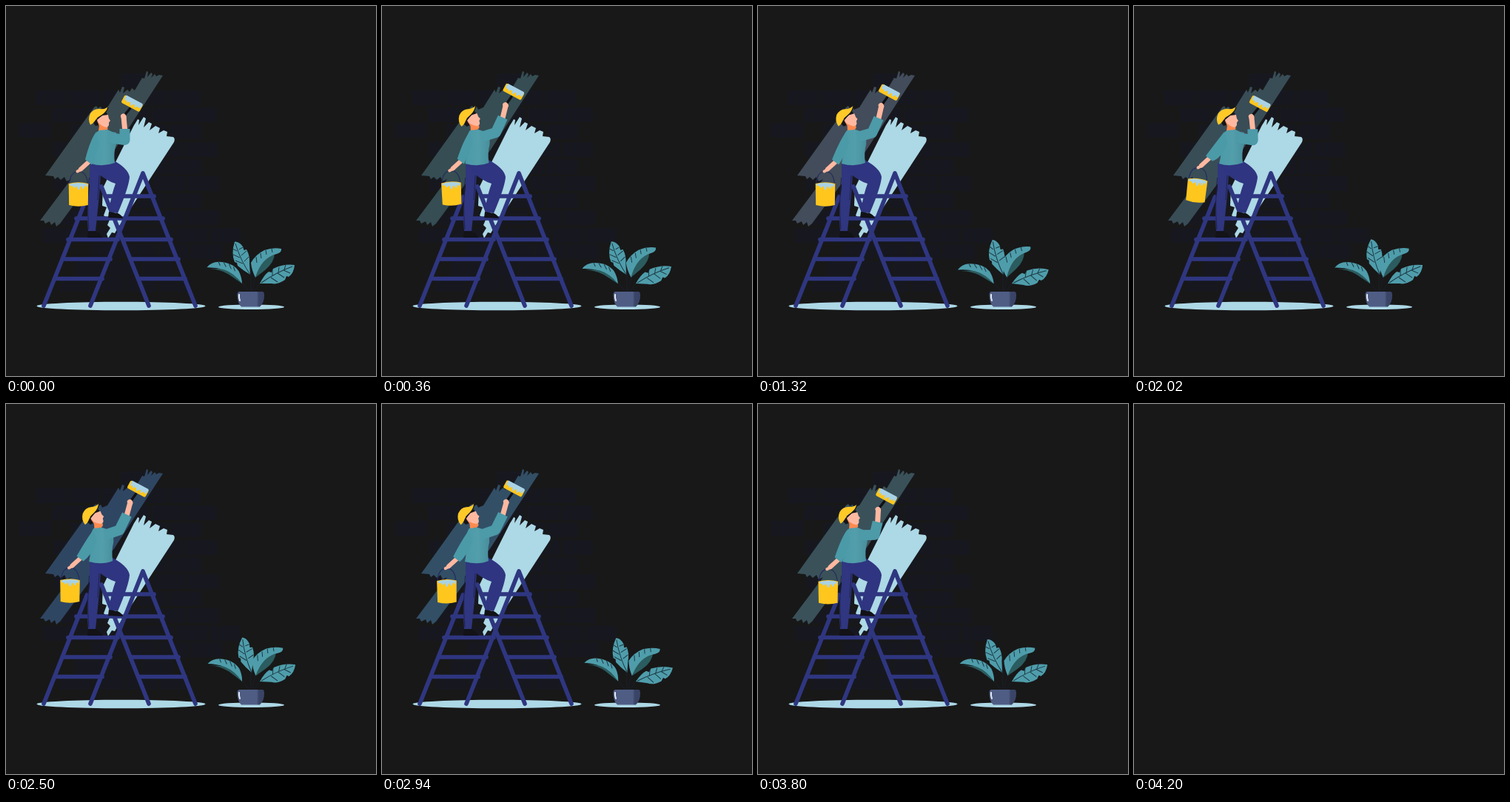
Write an HTML page that moves like this. It is 500x500 px and loops after 4220 ms.

```html
<!DOCTYPE html>
<html lang="en">
<head>
<meta charset="utf-8">
<title>Painter on a ladder</title>
<style>
html, body { margin: 0; width: 100%; height: 100%; overflow: hidden; background: #181818; }
svg { display: block; width: 100vw; height: 100vh; }
.vein { fill: none; stroke: #1b3843; stroke-width: 1; }
.skin { fill: none; stroke: #ffb8a0; stroke-linecap: round; stroke-linejoin: round; }
</style>
</head>
<body>
<svg viewBox="0 0 500 500">
  <defs>
    <linearGradient id="shirt"><stop offset="0" stop-color="#4b9aa8"/><stop offset=".55" stop-color="#539eab"/><stop offset="1" stop-color="#488f9d"/></linearGradient>
    <linearGradient id="pot"><stop offset=".72" stop-color="#4f5d85"/><stop offset=".8" stop-color="#3a4467"/></linearGradient>
  </defs>
  <g id="scene">
    <g id="bricks" fill="#17181f"/>
    <path id="strokes" d="M46 290L88 234L82 237L79 231L74 235L70 231L66 234L64 230L53 229L119 137L122 135L124 138L128 136L130 140L137 137L152 113L154 117L157 109L160 110L158 118L164 113L167 116L170 111L174 114L184 97L187 98L190 88L192 89L191 96L196 90L198 92L196 97L201 92L203 95L207 93L212 94L147 194L73 294L68 298L66 292L61 296L59 291L53 294L51 290Z"/>
    <path fill="#add8e6" d="M173 161L175 158L178 153L180 154L179 161L186 150L189 152L186 164L193 157L197 159L194 168L202 162L208 165L206 172L213 168L218 170L217 176L226 177Q229 179 227 184L157 291L151 300L147 307L143 306L138 314L136 308L141 300L137 296L140 289L132 283L136 272L130 270L131 246L146 215Z"/>
    <g fill="#add8e6">
      <ellipse cx="155.5" cy="405.5" rx="114" ry="5.8"/>
      <ellipse cx="331.5" cy="406.7" rx="44.5" ry="3.3"/>
    </g>
    <path id="ladder" fill="none" stroke="#2f3680" stroke-width="5.7" stroke-linecap="round" stroke-linejoin="round"
      d="M51 405L109.500 258M193 405L129 244M114 405L185 226L256 405M134 257H200M95 287H212M84 315.500H151M159 315.500H223M76 342H141M169 342H233M67 368.500H130M180 368.500H242"/>

    <g id="plant">
      <path d="M331 350V387M320 375L330 388M337 366L332 387M343 375L334 388" fill="none" stroke="#1a1c24" stroke-width="1.5"/>
      <g id="leafLeft">
        <path fill="#2b5c5f" d="M276 354Q290 355 301 362L319 375Q319 363 309 355Z"/>
        <path fill="#4f9dab" d="M272 352Q278 345 288 345Q307 346 315 358Q319 366 319 375Q309 361 296 356Q284 352 272 352Z"/>
        <path class="vein" d="M288 345L290 350M295 346L298 352M302 348L305 355M308 352L310 358"/>
      </g>
      <g id="leafUp">
        <path fill="#4f9dab" d="M309 318.500Q315 318 320 325L321.500 330L325 329Q330 338 329 348L330 363Q320 357 313 351L312 347L309 346Q304 334 309 318.500Z"/>
        <path class="vein" d="M310 321Q317 344 330 363M315 329L320 326M318 337L325 331M322 345L328 339M312 331L306 328M316 340L307 336M320 348L310 344"/>
      </g>
      <g id="leafRight">
        <path fill="#2b5c5f" d="M337 367Q342 344 363 334Q363 346 350 357Z"/>
        <path fill="#4f9dab" d="M372 328Q373 333 366 335Q345 340 337 367Q332 357 331 347Q337 336 349 330Q361 326 372 328Z"/>
        <path class="vein" d="M359 328L360 333M351 330L352 336M344 334L345 341M338 339L339 347"/>
      </g>
      <g id="leafLow">
        <path fill="#4f9dab" d="M390 350Q389 361 382 366L379 365L377 370Q367 377 359 375L343 375Q349 363 355 359L359 360L361 355Q376 348 390 350Z"/>
        <path class="vein" d="M387 352Q365 360 345 374M360 365L360 357M368 360L369 353M376 356L378 350M358 367L367 373M367 361L376 367M375 357L384 361"/>
      </g>
      <path fill="url(#pot)" d="M315 386H347Q349 386.500 349 391Q349 401 343 406.500H318Q313 402 312.500 391Q312.500 386.500 315 386Z"/>
      <path d="M315 390Q314.500 394 316 398" fill="none" stroke="#e3edf5" stroke-width="2" stroke-linecap="round"/>
    </g>

    <g id="legs">
      <path fill="#30367f" d="M113 212L129 212L126 256L121 304L111 304Q108 274 113 245Z"/>
      <path fill="#2f3580" d="M117 213L144 208Q165 219 167 231Q166 245 151 280L139 277Q142 256 148 240Q135 236 122 224Z"/>
      <path fill="none" stroke="#1b1e4a" stroke-width=".8" d="M112.500 232Q109 268 112 302M126 229L124 262"/>
      <path fill="#121217" d="M111 304.500L121 304.500Q129 308 130 313H110ZM139 278L151 280Q157 283 158 287L138 286Z"/>
    </g>
    <g id="bucket">
      <path d="M-12.500 17Q-11 0 0 0Q11 0 12.500 17" fill="none" stroke="#252b5e" stroke-width="1.2"/>
      <path fill="#ffc61e" d="M-13.300 16.500Q0 13 13.300 16.500L12.800 45.500Q0 49 -12.800 45.500Z"/>
      <path fill="#a9d2e6" d="M-12 17Q0 14 12 17L11.500 21Q10.500 22 9.500 19.500Q7.500 19.500 7.500 23Q5 25 4.500 20.500Q2 19.500 1.500 24Q-1 27 -2 20.500Q-4 19.500 -5 22Q-7 23 -8 19.500L-11 20Z"/>
    </g>
    <path id="leftSkin" class="skin" stroke-width="6"/>
    <path id="leftFingers" class="skin" stroke-width="4"/>
    <g id="head">
      <path fill="#15151a" d="M-16 1L-11 -8L5 -12L6 -8L-4 -4L-6 5L-10 6L-13 2Z"/>
      <path fill="#ff8a50" d="M-8 -1L-3 -1L6 7Q8 11 3 13L-6 13L-5 6Z"/>
      <path fill="#ffb8a0" d="M-8 -2L-1 -8L7 -9L8 -4L10 -1L8 1.500Q9 8 4 8Q-1 6.500 -5 3Z"/>
      <path fill="#ffc928" d="M-17 4.500Q-21 -3 -17 -11Q-12 -18 -4 -17Q2 -16 7 -19.500Q5.500 -13 -1 -9Q-7 -6 -10 -2Q-13 3 -17 4.500Z"/>
      <path fill="none" stroke="#17171b" stroke-width="1.2" d="M7 -19Q5.500 -13 -1 -8.500L-8 -4"/>
    </g>
    <path id="torso" fill="url(#shirt)"/>
    <path id="leftSleeve" fill="#4b9aa8"/>
    <path id="handle" fill="none" stroke="#101014" stroke-width="3.400" stroke-linecap="round"/>
    <path id="rightSkin" class="skin" stroke-width="7"/>
    <path id="rightFingers" class="skin" stroke-width="7"/>
    <path id="rightSleeve" fill="none" stroke="#4d9aa8" stroke-width="14" stroke-linejoin="round"/>
    <g id="roller">
      <rect x="-14" y="-5.500" width="28" height="11.500" rx="2" fill="#ffc61e"/>
      <path fill="#a9d2e6" d="M-12 -6H12.500Q14 -5 13 0Q11 3 9.500 0Q7.500 0 7 3Q5 4 4 0Q2 -1 1 3Q-1 5 -2.500 0Q-4 -1 -5.500 2Q-7 3 -8 0L-11 1Q-13 -3 -12 -6Z"/>
    </g>
  </g>
</svg>
<script>
const LOOP = 4220, SHOWN = 4200, CYCLE = 4200, STROKE = 2100;
const el = id => document.getElementById(id);
const set = (id, name, value) => el(id).setAttribute(name, value);
const path = (id, d) => set(id, 'd', d);
const mix = (a, b, k) => a.map((v, i) => v + (b[i] - v) * k);
const shift = (p, x, y) => [p[0] + x, p[1] + y];
const place = (id, p, angle) => set(id, 'transform', `translate(${p}) rotate(${angle})`);

// Smooth curve through keyed values that repeats every period.
function track(period, times, values) {
  const n = times.length;
  const at = i => times[(i + n) % n] + Math.floor(i / n) * period;
  const val = i => values[(i + n) % n];
  const slope = i => (val(i + 1) - val(i - 1)) / (at(i + 1) - at(i - 1));
  return time => {
    const t = time % period;
    let i = n - 1;
    while (times[i] > t) i--;
    const span = at(i + 1) - at(i), s = (t - at(i)) / span, q = s * s, c = q * s;
    return (2 * c - 3 * q + 1) * val(i) + (c - 2 * q + s) * span * slope(i)
      + (3 * q - 2 * c) * val(i + 1) + (c - q) * span * slope(i + 1);
  };
}

const poses = [0, 760, 1320, 2020, 2500, 3360];
const long = values => track(CYCLE, poses, values);
const beats = [0, 420, 760, 1290, 2020];
const reach = track(STROKE, beats, [0, 1, 1, .88, -.02]);
const lean = track(STROKE, beats, [0, .96, 1.03, .72, .01]);
const handX = long([98, 86, 91, 88, 86.5, 89]);
const handY = long([223.5, 221.5, 223.5, 218.5, 221.5, 222.5]);
const swing = long([0, -4.5, 0, 6.5, 0, -.8]);
const tint = [[58, 50, 66, 57, 47, 55], [75, 80, 76, 77, 70, 86], [81, 89, 90, 87, 98, 101]].map(long);

const rows = [
  [155, 91, 1], [40, 114, 5], [62, 137, 5], [18, 158, 1], [87, 160, 4], [63, 184, 5],
  [87, 207, 4], [65, 230, 5], [87, 253, 4], [65, 276, 5], [50, 300, 6], [115, 322, 4],
  [93, 345, 3], [72, 366, 4]
];
el('bricks').innerHTML = rows.map(([x, y, n]) => Array.from({ length: n }, (_, i) =>
  `<rect x="${x + i * 45}" y="${y}" width="42.500" height="20"/>`).join('')).join('');

function drawLeaves(t) {
  const turn = t / CYCLE * 2 * Math.PI;
  const rotate = (id, angle, x, y) => set(id, 'transform', `rotate(${angle} ${x} ${y})`);
  rotate('leafLeft', -1.3 - 4.2 * Math.sin(turn), 322, 379);
  rotate('leafUp', 5.6 * (1 - Math.cos(turn)), 331, 374);
  rotate('leafRight', -4.6 * Math.sin(turn), 333, 378);
  rotate('leafLow', 4.3 * (1 - Math.cos(2 * turn)), 343, 375);
}

function drawBody(t) {
  const k = lean(t), neck = -8 * k, chest = -4 * k, waist = -3 * k;
  place('head', [131 - 9 * k, 156 - k], -13 * k);
  path('torso', `M${126 + neck} 168Q${119 + chest} 171 ${117 + chest} 184Q${119 + chest} 200 ${115 + waist} 213
    Q130 218 ${147 + waist} 212Q${145 + waist} 198 ${149 + chest} 187L${149 + chest} 171
    Q${142 + chest} 170 ${137 + neck} 167Z`);

  const hand = [handX(t), handY(t)], cuff = shift(hand, 14, -13);
  path('leftSkin', `M${cuff}L${shift(hand, 3, -3)}`);
  path('leftFingers', `M${shift(hand, 4, -3)}L${shift(hand, -1.5, 0)}`);
  path('leftSleeve', `M${122 + chest} 170Q${114 + chest} 180 ${shift(cuff, -5, -3)}L${shift(cuff, 4, 4)}
    Q${118 + chest} 206 ${126 + chest} 186Z`);
  place('bucket', hand, swing(t));
}

function drawRoller(t) {
  const k = reach(t);
  const shoulder = mix([140, 178], [133, 177], k);
  const elbow = mix([160.5, 181], [153, 170], k);
  const cuff = mix([160.5, 166], [163.5, 149], k);
  const grip = mix([159, 150], [168, 133], k);
  const roller = mix([170.5, 131.5], [178.7, 114], k);
  path('rightSleeve', `M${shoulder}L${elbow}L${cuff}`);
  path('rightSkin', `M${cuff}L${grip}`);
  path('rightFingers', `M${grip}L${shift(grip, -.5, -1)}`);
  path('handle', `M${shift(grip, 0, -1)}L${shift(roller, -3, 7)}`);
  place('roller', roller, 28);
}

function draw(t) {
  const shown = t < SHOWN;
  set('scene', 'visibility', shown ? 'visible' : 'hidden');
  if (!shown) return;
  set('strokes', 'fill', `rgb(${tint.map(channel => Math.round(channel(t)))})`);
  drawLeaves(t);
  drawBody(t);
  drawRoller(t);
}

const start = performance.now();
function tick() {
  draw((performance.now() - start) % LOOP);
  requestAnimationFrame(tick);
}
tick();
</script>
</body>
</html>
```
